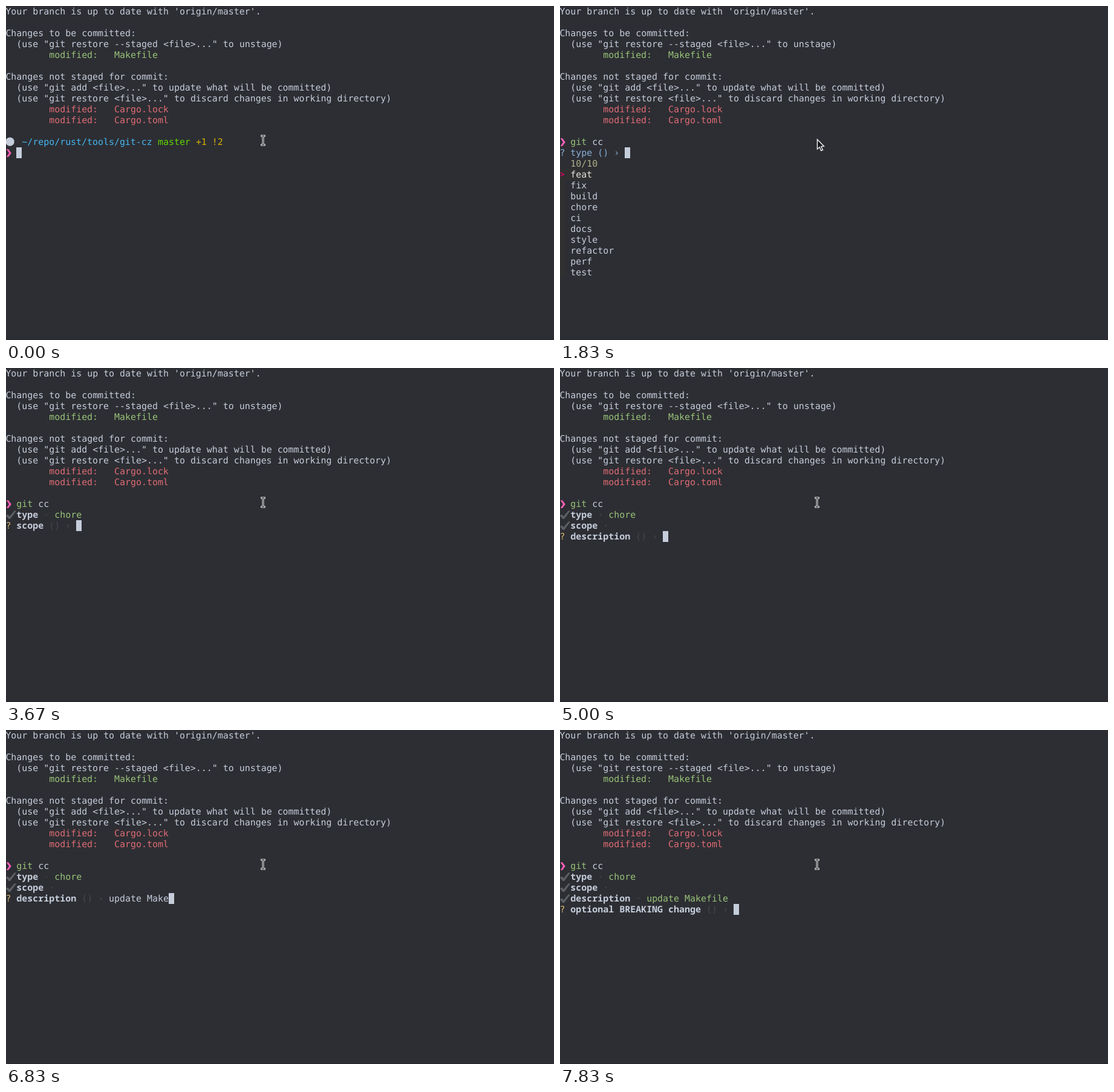
An HTML page with a canvas that plays this animation: 906 by 553 pixels, repeating every 8 s.

```html
<!DOCTYPE html>
<html lang="en">
<head>
<meta charset="utf-8">
<title>Terminal commit session</title>
<style>
html, body { margin: 0; width: 100%; height: 100%; overflow: hidden; background: #2d2e33; }
canvas { display: block; }
</style>
</head>
<body>
<canvas id="screen" width="906" height="553"></canvas>
<script>
const ctx = document.getElementById('screen').getContext('2d');
const LOOP = 8000, CELL = 8.985, LEFT = -0.6, ROW = 18;
const REGULAR = '14.925px "DejaVu Sans Mono", monospace';
const BOLD = 'bold 14.975px "Noto Sans Mono", monospace';
const C = {
  bg: '#2d2e33', fg: '#c5cddb', green: '#98c379', red: '#e06c75', dim: '#45484f',
  yellow: '#d9b872', pink: '#ff5fb9', path: '#45b6f2', branch: '#5fd700', status: '#d7af00',
  prompt: '#87afd7', info: '#afaf87', marker: '#d7005f', current: '#e4e4e4',
  match: '#afd7af', gutter: '#303030', check: '#5c6064'
};
const TYPES = ['feat', 'fix', 'build', 'chore', 'ci', 'docs', 'style', 'refactor', 'perf', 'test'];

// Each entry: [start time, text typed so far]
const COMMAND = [[0, ''], [670, 'g'], [830, 'git'], [1000, 'git '], [1170, 'git c'], [1330, 'git cc']];
const QUERY = [[1830, ''], [3000, 'c'], [3170, 'ch']];
const MESSAGE = 'update Makefile';
const MESSAGE_LENGTH = [[5000, 0], [5670, 2], [5830, 4], [6000, 6], [6170, 7], [6500, 8],
  [6670, 9], [6830, 11], [7170, 13], [7330, 14], [7500, 15]];

const colX = col => LEFT + col * CELL;
const at = (steps, t) => steps.filter(([start]) => start <= t).pop()[1];

function write(row, col, text, color = C.fg, font = REGULAR) {
  ctx.font = font;
  ctx.fillStyle = color;
  for (const word of text.matchAll(/\S+/g)) {
    ctx.fillText(word[0], colX(col + word.index), row * ROW + 14);
  }
}

function block(row, col, color = C.fg, cells = 1) {
  const x = Math.round(colX(col));
  ctx.fillStyle = color;
  ctx.fillRect(x, row * ROW, Math.round(colX(col + cells)) - x, ROW);
}

function shape(points, x, y) {
  ctx.beginPath();
  points.forEach(([px, py]) => ctx.lineTo(x + px, y + py));
  ctx.closePath();
}

function chevron(row) {
  shape([[0.8, 3], [4, 3], [8.8, 9.5], [4, 16], [0.8, 16], [5, 9.5]], 0, row * ROW);
  ctx.fillStyle = C.pink;
  ctx.fill();
}

function checkmark(row) {
  shape([[0, 10.5], [3, 8.5], [6, 11.5], [14, 2], [17, 2.5], [7, 16], [4.5, 16]], 0, row * ROW);
  ctx.fillStyle = C.check;
  ctx.fill();
}

function answered(row, label, value = '') {
  checkmark(row);
  write(row, 2, label, C.fg, BOLD);
  write(row, label.length + 3, '·', C.dim);
  write(row, label.length + 5, value, C.green);
}

function question(row, label, value = '') {
  const start = label.length + 8;
  write(row, 0, '?', C.yellow);
  write(row, 2, label, C.fg, BOLD);
  write(row, label.length + 3, '() ›', C.dim);
  write(row, start, value);
  block(row, start + value.length);
}

function gitStatus() {
  write(0, 0, "Your branch is up to date with 'origin/master'.");
  write(2, 0, 'Changes to be committed:');
  write(3, 2, '(use "git restore --staged <file>..." to unstage)');
  write(4, 8, 'modified:   Makefile', C.green);
  write(6, 0, 'Changes not staged for commit:');
  write(7, 2, '(use "git add <file>..." to update what will be committed)');
  write(8, 2, '(use "git restore <file>..." to discard changes in working directory)');
  write(9, 8, 'modified:   Cargo.lock', C.red);
  write(10, 8, 'modified:   Cargo.toml', C.red);
}

function shell(t) {
  const text = at(COMMAND, t);
  ctx.fillStyle = C.fg;
  ctx.beginPath();
  ctx.arc(6.5, 224.7, 7.2, 0, Math.PI * 2);
  ctx.fill();
  write(12, 3, '~/repo/rust/tools/git-cz', C.path);
  write(12, 28, 'master', C.branch);
  write(12, 35, '+1 !2', C.status);
  chevron(13);
  write(13, 2, text.slice(0, 3), text === 'g' ? C.red : C.green);
  write(13, 6, text.slice(4));
  block(13, 2 + text.length);
}

function picker(t) {
  const query = at(QUERY, t);
  const filtered = query === 'ch';
  const list = filtered ? ['chore'] : TYPES;
  write(13, 0, '? type () ›', C.prompt);
  write(13, 12, query);
  block(13, 12 + query.length);
  write(14, 2, query ? (filtered ? '1/10' : '0/10') : '10/10', C.info);
  list.forEach((name, i) => {
    block(15 + i, 0, C.gutter, i ? 1 : 2 + name.length);
    write(15 + i, 2, name, i ? C.fg : C.current);
  });
  write(15, 0, '>', C.marker, BOLD);
  if (filtered) write(15, 2, query, C.match);
}

function prompts(t) {
  answered(13, 'type', 'chore');
  if (t < 5000) return question(14, 'scope');
  answered(14, 'scope');
  if (t < 7830) return question(15, 'description', MESSAGE.slice(0, at(MESSAGE_LENGTH, t)));
  answered(15, 'description', MESSAGE);
  question(16, 'optional BREAKING change');
}

function textPointer() {
  ctx.beginPath();
  ctx.moveTo(422.7, 215);
  ctx.lineTo(427.3, 215);
  ctx.moveTo(425, 215);
  ctx.lineTo(425, 230);
  ctx.moveTo(422.7, 230);
  ctx.lineTo(427.3, 230);
  ctx.lineCap = 'square';
  for (const [color, width] of [['#f2f2f2', 3], ['#18191c', 1]]) {
    ctx.strokeStyle = color;
    ctx.lineWidth = width;
    ctx.stroke();
  }
}

function arrowPointer() {
  shape([[0, 0], [0, 16], [3.7, 12.6], [6.4, 18.5], [9, 17.3], [6.4, 11.6], [11, 11.2]], 425.4, 221);
  ctx.fillStyle = '#18191c';
  ctx.fill();
  ctx.strokeStyle = '#f2f2f2';
  ctx.lineWidth = 1.4;
  ctx.stroke();
}

function draw(t) {
  ctx.fillStyle = C.bg;
  ctx.fillRect(0, 0, 906, 553);
  ctx.fillStyle = '#232428';
  ctx.fillRect(0, 552, 906, 1);
  gitStatus();
  if (t < 1830) {
    shell(t);
  } else {
    chevron(12);
    write(12, 2, 'git', C.green);
    write(12, 6, 'cc');
    (t < 3670 ? picker : prompts)(t);
  }
  (t >= 1670 && t < 3670 ? arrowPointer : textPointer)();
}

ctx.textRendering = 'geometricPrecision';
const began = performance.now();
function frame() {
  draw((performance.now() - began) % LOOP);
  requestAnimationFrame(frame);
}
frame();
</script>
</body>
</html>
```
